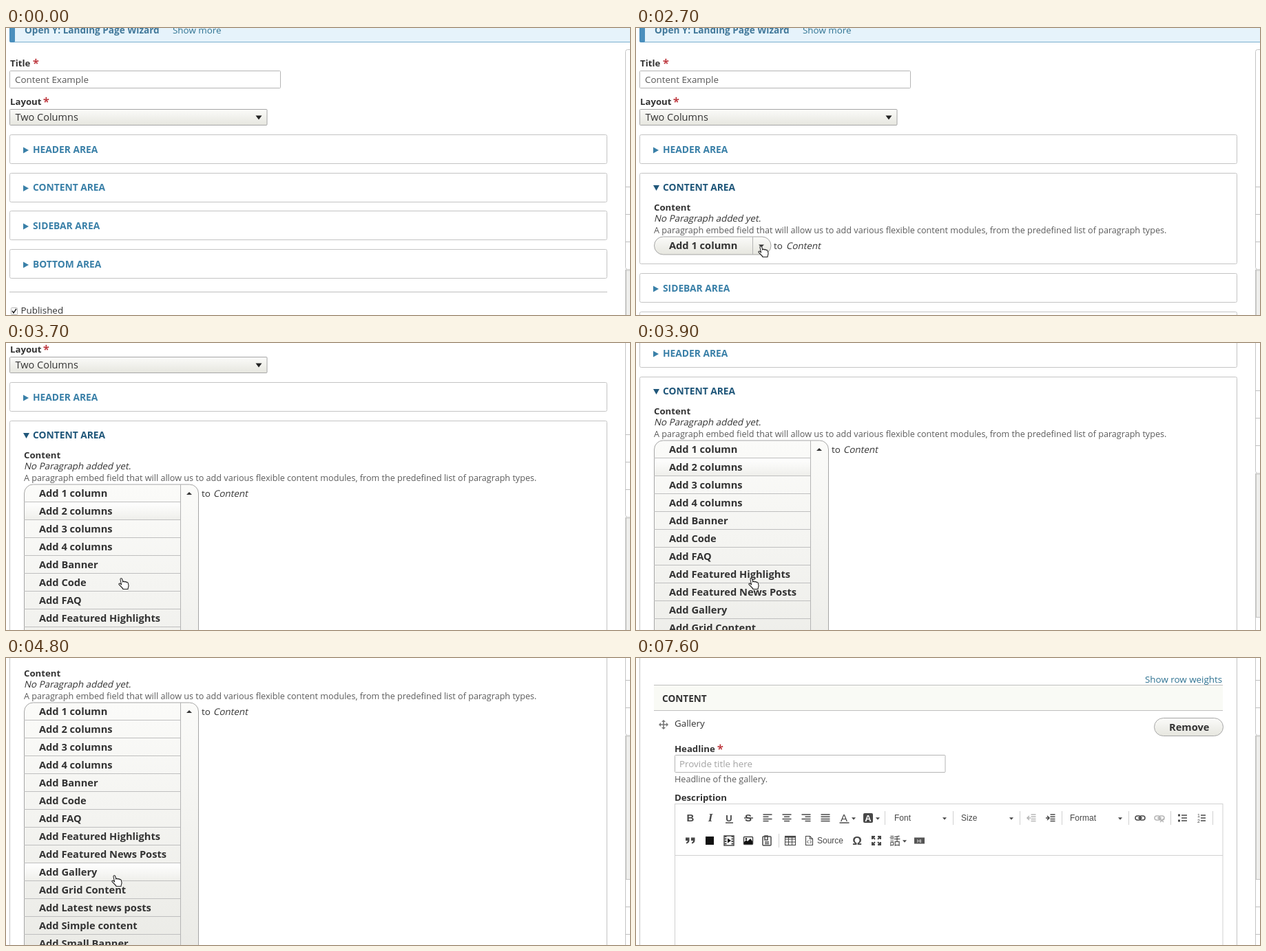
An HTML page for the animation above (8500 ms loop, 906 px wide and 418 px high).

```html
<!DOCTYPE html>
<html lang="en">
<head>
<meta charset="utf-8">
<title>Adding a paragraph</title>
<style>
html, body { margin: 0; width: 100%; height: 100%; overflow: hidden; background: #fff; }
svg { display: block; }
text { font-family: "Open Sans", "Noto Sans", sans-serif; font-size: 13.4px; fill: #333; white-space: pre; }
.label { font-weight: 700; font-size: 13.2px; }
.area { font-weight: 700; font-size: 13.8px; fill: #3a80a8; }
.open .area { fill: #20577a; }
.button { font-weight: 700; font-size: 14.65px; }
.hint { font-size: 12.62px; fill: #5c5c5c; }
.select { font-size: 14.5px; }
.value { fill: #595959; }
.ghost { fill: #a3a3a3; }
.link { fill: #2f7392; }
.star { font-size: 16px; fill: #b8282f; stroke: #b8282f; stroke-width: .3; }
.note { font-weight: 700; font-size: 13.57px; fill: #41789a; }
.head { font-weight: 700; font-size: 13.6px; }
.tool { font-family: "Liberation Sans", Arial, sans-serif; font-size: 12px; fill: #484848; }
.glyph { font-family: "Liberation Sans", Arial, sans-serif; font-size: 15px; font-weight: 700; fill: #484848; text-anchor: middle; }
.cjk { font-family: "Noto Sans CJK JP", "Noto Sans CJK", sans-serif; font-size: 16px; fill: #484848; }
.box { fill: #fff; stroke: #c4c4c4; }
.field { fill: #fff; stroke: #b5b5b5; }
.rule { stroke: #bfbfbf; }
.pale { stroke: #d1d1d1; fill: none; }
.pill { fill: url(#pillFill); stroke: #a6a6a6; }
.ink { stroke: #484848; stroke-width: 1.5; fill: none; }
.off { opacity: .4; }
</style>
</head>
<body>
<svg id="stage" width="906" height="418" viewBox="0 0 906 418" xmlns="http://www.w3.org/2000/svg"></svg>
<script>
const LOOP = 8500, STEP = 100, SCROLL = 239;
const ITEMS = ['1 column', '2 columns', '3 columns', '4 columns', 'Banner', 'Code', 'FAQ',
  'Featured Highlights', 'Featured News Posts', 'Gallery', 'Grid Content',
  'Latest news posts', 'Simple content', 'Small Banner', 'Teaser', 'Story Card'];

// Markup helpers
const text = (x, y, s, cls = '') => `<text x="${x}" y="${y}" class="${cls}">${s}</text>`;
const slant = (x, y, s) => `<text transform="translate(${x} ${y}) skewX(-12)">${s}</text>`;
const rect = (x, y, w, h, cls, r = 0, more = '') =>
  `<rect x="${x}" y="${y}" width="${w}" height="${h}" rx="${r}" class="${cls}" ${more}/>`;
const path = (d, cls = '', more = '') => `<path d="${d}" class="${cls}" ${more}/>`;
const at = (x, y, s, cls = '') => `<g transform="translate(${x} ${y})" class="${cls}">${s}</g>`;
const group = (id, s) => `<g id="${id}">${s}</g>`;
const grad = (id, a, b) => `<linearGradient id="${id}" x2="0" y2="1"><stop stop-color="${a}"/>
  <stop offset="1" stop-color="${b}"/></linearGradient>`;
const caret = (x, y, w = 6, h = 3.5, fill = '#484848') =>
  path(`M${x - w / 2} ${y - h / 2}h${w}l${-w / 2} ${h}z`, '', `fill="${fill}"`);
const area = (y, name) => rect(5.5, y, 867, 42, 'box', 2) + summary(y, name);
const summary = (y, name) =>
  path(`M25 ${y + 18}l8 4.5-8 4.5z`, 'area') + text(39, y + 26.3, name, 'area');

function panel() {
  const line = y => path(`M899 ${y}h8`, 'rule');
  return rect(899.5, 31.5, 20, 320, 'box', 3) +
    [231.5, 271.5, 311.5].map(line).join('') +
    rect(900, 352, 8, 209, '', 0, 'fill="#efefed"') +
    path('M900 352.5h8', '', 'stroke="#d9d9d7" stroke-width="3"') +
    path('M900 352v209', '', 'stroke="#c6c6c4" stroke-width="2"') +
    rect(899.5, 561.5, 20, 400, 'box') + [601.5, 641.5].map(line).join('');
}

function topFields() {
  return rect(6, -30, 910, 50.5, '', 2, 'fill="#e6f3fb" stroke="#79aece"') +
    rect(5, -30, 8, 51, '', 2, 'fill="#4a8fbd"') +
    text(27, 8, 'Open Y: Landing Page Wizard', 'note') +
    text(242, 8, 'Show more', 'link') +
    text(6, 56, 'Title', 'label') + text(39, 57, '*', 'star') +
    rect(5.5, 62.5, 393, 25, 'field', 1) + text(13, 80, 'Content Example', 'value') +
    text(6, 112, 'Layout', 'label') + text(54, 113, '*', 'star') +
    rect(5.5, 118.5, 373.5, 23, 'pill', 1) + text(13.5, 135, 'Two Columns', 'select') +
    caret(367, 130.5, 9, 6, '#222');
}

function below() {
  return area(266.5, 'SIDEBAR AREA') + area(322.5, 'BOTTOM AREA') +
    path('M5 384.5h868', 'rule') +
    rect(7.5, 407.5, 9, 10, 'field', 1) + path('M9 412l2 3 4-6', '', 'fill="none" stroke="#222" stroke-width="1.5"') +
    text(21.5, 416.3, 'Published');
}

function dropdown() {
  const rows = ITEMS.map((s, i) => {
    const y = 304 + 26 * i;
    return text(48, y + 18.4, 'Add ' + s, 'button') + path(`M26 ${y + 25.5}h227`, 'rule');
  }).join('');
  return path('M26.5 900V317a13 13 0 0 1 13-13H266.5a13 13 0 0 1 13 13V900z', '', 'fill="url(#menuFill)" stroke="#a6a6a6"') +
    rect(27, 0, 226, 25, '', 0, 'id="hover" fill="url(#hotFill)"') +
    rows + path('M253.5 304v600', '', 'stroke="#b4b4b4"') +
    path('M262 319h8l-4-4z', '', 'fill="#333"') +
    text(284, 322, 'to') + slant(301, 322, 'Content');
}

function contentBody() {
  const closed = rect(26.5, 304, 169.5, 26, 'pill', 13) + path('M169.5 304v26', '', 'stroke="#b4b4b4"') +
    text(48, 322.4, 'Add 1 column', 'button') + caret(182, 317.5, 8, 4, '#333') +
    text(200, 322, 'to') + slant(218, 322, 'Content');
  return text(26, 265.5, 'Content', 'label') + slant(26, 281.7, 'No Paragraph added yet.') +
    text(26, 299, 'A paragraph embed field that will allow us to add various flexible content modules, from the predefined list of paragraph types.', 'hint') +
    group('closed', closed) + group('menu', dropdown());
}

// Editor icons are drawn around their own centre
const bars = (ws, align) => path(ws.map((w, i) =>
  `M${-6.5 + (13 - w) * align} ${-5 + 3.2 * i}h${w}`).join(''), 'ink');
const chain = () => rect(-7, -3, 8, 6, 'ink', 3) + rect(-1, -3, 8, 6, 'ink', 3) + path('M-3 0h6', 'ink');
const page = () => path('M-5-6.5h6l4 4v9h-10zM1-6.5v4h4', 'ink', 'style="stroke-width:1.1"');

function toolbar() {
  const y1 = 233, y2 = 266;
  const sep = (x, y) => path(`M${x} ${y - 10}v20`, 'pale');
  const glyph = (x, s, more = '') => `<text x="${x}" y="${y1 + 5.3}" class="glyph" ${more}>${s}</text>`;
  const tiny = (x, y, s, fill) => `<text x="${x}" y="${y}" class="tool" style="font-size:7px;fill:${fill}">${s}</text>`;
  const row1 = glyph(79, 'B') + glyph(108, 'I', 'style="font-family:Liberation Serif,serif;font-style:italic;font-size:17px"') +
    glyph(135, 'U', 'style="font-size:13px"') + path('M130 240h11', 'ink') +
    glyph(163, 'S') + path('M157 233h13', 'ink') +
    [[191, 0], [219, .5], [247, 1]].map(([x, a]) => at(x, y1, bars([13, 8, 13, 8], a))).join('') +
    at(275, y1, bars([13, 13, 13, 13], 0)) +
    glyph(302, 'A', 'style="font-weight:400"') + path('M295.5 240h14', 'ink') + caret(316, 234) +
    rect(330, 226, 14, 14, '', 2, 'fill="#484848"') +
    glyph(337, 'A', 'style="fill:#fff;font-size:13px"') + caret(351, 234) +
    [['Font', 375, 448], ['Size', 472, 545], ['Format', 630, 703]].map(([s, x, c]) =>
      text(x, 237.3, s, 'tool') + caret(c, 234)).join('') +
    [361.5, 460.5, 557.5, 618.5, 715.5, 776.5, 837.5].map(x => sep(x, y1)).join('') +
    at(574, y1, bars([7, 7, 7, 7], 1) + path('M-3-3l-3 3 3 3M-6 0h5', 'ink'), 'off') +
    at(602, y1, bars([7, 7, 7, 7], 1) + path('M-5-3l3 3-3 3M-7 0h5', 'ink')) +
    at(732, y1, chain()) + at(760, y1, chain() + path('M1 1l5 5m0-5l-5 5', 'ink'), 'off') +
    at(793, y1, path('M-1-4h8M-1 0h8M-1 4h8', 'ink') + path('M-6-4h3M-6 4h3', 'ink', 'style="stroke-width:3"')) +
    at(821, y1, path('M-1-4h7M-1 0h7M-1 4h7', 'ink') + tiny(-6, -1, '1', '#484848') + tiny(-6, 7, '2', '#484848'));
  const quote = x => `M${x}-4.5h5.5v4q0 4-4.5 5v-1.8q2-.8 2-2.7h-3z`;
  const row2 = at(79, y2, path(quote(-7) + quote(1), '', 'fill="#484848"')) +
    rect(101, 260, 12, 12, '', 0, 'fill="#111"') +
    at(135, y2, rect(-7, -7, 14, 14, 'ink') + path('M-5-7v14M5-7v14', 'ink', 'stroke-dasharray="2 1.5" style="stroke-width:3"') +
      path('M-2-3.5l5 3.5-5 3.5z', '', 'fill="#111"')) +
    at(163, y2, rect(-6.5, -5.5, 13, 11, 'ink', 1) + path('M-6 5v-3l3-3 2 2 4-4 3 4v4z', '', 'fill="#111"') +
      '<circle cx="-3" cy="-2.5" r="1.3"/>') +
    at(190, y2, rect(-6, -6, 12, 13, 'ink', 1) + path('M-3-7h4v6h-4zM-3 2h6M-3 4.5h6', 'ink')) +
    sep(207.5, y2) +
    at(224, y2, rect(-7.5, -6.5, 15, 13, 'ink', 0, 'style="stroke-width:1.1"') +
      path('M-7.5-2h15M-7.5 2h15M-2.5-5v11.5M2.5-5v11.5', 'ink', 'style="stroke-width:1"') + path('M-7.5-5.5h15', 'ink', 'style="stroke-width:2.5"')) +
    at(251.5, y2, page() + path('M-1-.5l-2 2.3 2 2.3M1-.5l2 2.3-2 2.3', 'ink', 'style="stroke-width:1"')) +
    text(263, 270.3, 'Source', 'tool') +
    '<text x="321" y="272" class="glyph" style="font-size:17px">Ω</text>' +
    at(349, y2, path('M-6-2v-4h4M2-6h4v4M6 2v4h-4M-2 6h-4v-4M-6-6l4 4M6-6l-4 4M6 6l-4-4M-6 6l4-4', 'ink', 'style="stroke-width:2"')) +
    text(368, 272, '話', 'cjk') + caret(390, 267) +
    rect(404, 261.5, 15, 9, '', 0, 'fill="#555"') + tiny(408, 268.5, 'Hi', '#fff');
  return row1 + row2 + path('M57 287.5h795', 'pale');
}

function form() {
  return text(739, 36, 'Show row weights', 'link') +
    rect(26, 39, 826, 38, '', 0, 'fill="#f9faf5"') + path('M26 39.5h826M26 76.5h826', 'rule') +
    text(38, 63.6, 'CONTENT', 'head') +
    at(40, 97, path('M-5 0h10M0-5v10', '', 'stroke="#777" stroke-width="1.6"') +
      path('M-7 0l3-3v6zM7 0l-3-3v6zM0-7l-3 3h6zM0 7l-3-3h6z', '', 'fill="#777"')) +
    text(56, 100, 'Gallery') +
    rect(752.5, 87.5, 100, 26, 'pill', 13) + text(774, 105.8, 'Remove', 'button') +
    text(56, 137, 'Headline', 'label') + text(118, 138, '*', 'star') +
    rect(56.5, 141.5, 392.5, 25, 'field', 1) + text(63, 159, 'Provide title here', 'ghost') +
    text(56, 181, 'Headline of the gallery.', 'hint') +
    text(56, 207.5, 'Description', 'label') +
    rect(56.5, 212.5, 795.5, 300, 'pale') + group('toolbar', toolbar());
}

const HAND = 'M-1 1.5C-1.3-.6 1.3-1 1.7 1L2.7 5.2C3.2 3.7 5 3.8 5.4 5.2C5.9 4.2 7.6 4.4 8 5.8C8.6 5 10 5.4 10.3 6.8L11 10C11.2 12 10 13 10 15.5H3C2.5 13.5-.5 11.8-3 8.6C-3.6 7.3-2 6.4-.8 7.6L.6 9Z';
const ARROW = 'M0 0V13L3 10.2 5 15 7.2 14 5.2 9.4H9.2Z';

const $ = id => document.getElementById(id);
const show = (id, on) => $(id).setAttribute('display', on ? 'inline' : 'none');
const move = (id, x, y) => $(id).setAttribute('transform', `translate(${x} ${y})`);

$('stage').innerHTML =
  `<defs>${grad('pillFill', '#fbfbf9', '#e6e6df')}${grad('menuFill', '#fbfbf9', '#e0e0da')}${grad('hotFill', '#fff', '#efefeb')}</defs>` +
  group('page', panel() + topFields() + area(155.5, 'HEADER AREA') +
    rect(5.5, 211.5, 867, 42, 'box', 2, 'id="frame"') +
    group('shut', summary(211, 'CONTENT AREA')) +
    group('open', `<g class="open">${path('M25 229h9l-4.5 8z', 'area')}${text(39, 237.3, 'CONTENT AREA', 'area')}</g>` + contentBody()) +
    group('below', below())) +
  group('form', form()) +
  group('cursor', path(HAND, '', 'id="hand" fill="#fff" stroke="#222" stroke-width="1.1" stroke-linejoin="round"') +
    path(ARROW, '', 'id="arrow" stroke="#fff"'));

// Pointer tip: time, x, y
const TRACK = [[0, 700, 440], [100, 700, 425], [900, 92, 232], [1800, 110, 238], [2000, 110, 238],
  [2600, 181, 318], [2900, 181, 318], [3300, 167, 343], [4400, 167, 343], [4700, 157, 317],
  [4800, 157, 317], [5100, 158, 312], [7100, 158, 312], [7500, 150, 430], [LOOP, 150, 440]];

function tip(t) {
  const i = TRACK.findIndex(k => k[0] > t);
  const [a, b] = [TRACK[i - 1], TRACK[i]];
  const p = (t - a[0]) / (b[0] - a[0]), e = p * p * (3 - 2 * p);
  return [a[1] + (b[1] - a[1]) * e, a[2] + (b[2] - a[2]) * e];
}

function draw(t) {
  const opened = t >= 1500, listed = t >= 2900, added = t >= 6800;
  const p = Math.min(1, Math.max(0, (t - 3436) / 980));
  move('page', 0, -Math.round(SCROLL * Math.sin(p * Math.PI / 2)));
  $('frame').setAttribute('height', listed ? 900 : opened ? 132 : 42);
  show('shut', !opened);
  show('open', opened && !added);
  show('closed', !listed);
  show('menu', listed);
  show('below', !listed);
  move('below', 0, opened ? 91 : 0);
  show('hover', t >= 3100);
  $('hover').setAttribute('y', 304 + 26 * (t < 4500 ? 1 : 9));
  show('form', added);
  show('toolbar', t >= 7100);
  const hand = t >= 900 && t < 2100 || t >= 2500 && t < 6700;
  show('hand', hand);
  show('arrow', !hand);
  move('cursor', ...tip(t));
}

const start = performance.now();
function tick() {
  const t = (performance.now() - start) % LOOP;
  draw(Math.floor(t / STEP) * STEP);
  requestAnimationFrame(tick);
}
tick();
</script>
</body>
</html>
```
